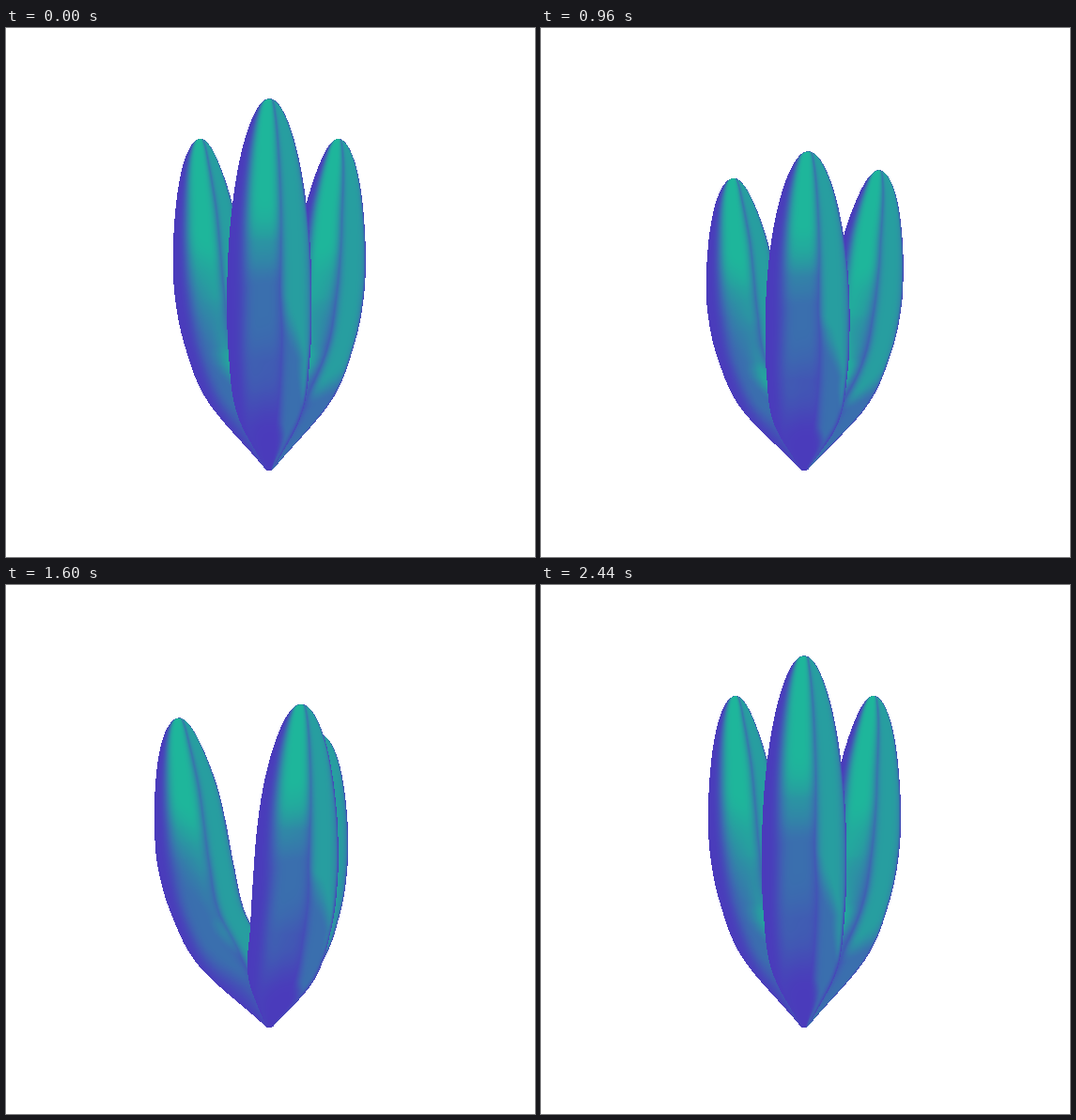
An HTML page with a canvas that plays this animation: 563x563 px, repeating every 2.48 s.

```html
<!DOCTYPE html>
<html>
<head>
<meta charset="utf-8">
<title>Turning petals</title>
<style>
html, body { margin: 0; width: 100%; height: 100%; overflow: hidden; background: #fff; }
canvas { position: absolute; left: 0; top: 0; width: 563px; height: 563px; }
</style>
</head>
<body>
<canvas id="stage" width="563" height="563"></canvas>
<script>
const SIZE = 563, LOOP = 2480, STEP = 40, LEAD = 10;
const BASE_X = 280.3, BASE_Y = 469.5, DEPTH = 0.00174, LIFT = 0.36;
const RINGS = 64, SIDES = 56;

// Petal profile from tip to base, at even steps of sqrt(1 - height)
const OUTER = [94, 101.5, 108.5, 114.5, 119, 122, 123, 120, 106, 76, 4];
const INNER = [94, 87, 79, 70.5, 61, 51.5, 44, 36.5, 25.5, -2, -4];
const WIDTH = [0, 7, 14, 21, 27.5, 33, 37, 38.8, 38.2, 32, 4];

const ctx = document.getElementById("stage").getContext("2d");
const image = ctx.createImageData(SIZE, SIZE);
const pixels = new Uint32Array(image.data.buffer);
const near = new Float32Array(SIZE * SIZE);

const clamp = (v, a = 0, b = 1) => Math.min(b, Math.max(a, v));
const smooth = (a, b, v) => {
  const p = clamp((v - a) / (b - a));
  return p * p * (3 - 2 * p);
};
const mix = (a, b, p) => a + (b - a) * p;

function curve(list, u) {
  const last = list.length - 1;
  const i = Math.min(last - 1, Math.floor(u * last)), f = u * last - i;
  const b = list[i], c = list[i + 1];
  const a = i > 0 ? list[i - 1] : 2 * b - c;
  const d = i + 2 <= last ? list[i + 2] : 2 * c - b;
  return b + 0.5 * f * (c - a + f * (2 * a - 5 * b + 4 * c - d + f * (3 * (b - c) + d - a)));
}

// Colour ramp from shade to light
const STOPS = [[0, 74, 59, 187], [0.4, 58, 111, 174], [0.8, 38, 160, 159], [1, 30, 182, 155]];
const ramp = new Uint32Array(256).map((_, i) => {
  const t = i / 255;
  let k = 0;
  while (k < 2 && t > STOPS[k + 1][0]) k++;
  const a = STOPS[k], b = STOPS[k + 1], p = (t - a[0]) / (b[0] - a[0]);
  const ch = n => Math.round(mix(a[n], b[n], p));
  return (255 << 24 | ch(3) << 16 | ch(2) << 8 | ch(1)) >>> 0;
});

const profile = [];
for (let i = 0; i <= RINGS; i++) {
  const u = mix(0.004, 1, i / RINGS);
  const at = q => {
    const o = curve(OUTER, q), n = curve(INNER, q);
    return [(o + n) / 2, (o - n) / 2, curve(WIDTH, q)];
  };
  const from = Math.max(0, u - 0.004), to = Math.min(1, u + 0.004);
  const lo = at(from), hi = at(to);
  profile.push({ u, v: at(u), d: hi.map((h, k) => (h - lo[k]) / (to - from)) });
}

function vertex(ring, phi, angle, height, reach) {
  const { u, v: [c0, h, w], d: [dc0, dh, dw] } = ring;
  const c = c0 + reach * (1 - u * u), dc = dc0 - 2 * u * reach;
  const co = Math.cos(phi), si = Math.sin(phi);
  const r = c + h * co, q = w * si, y = height * (1 - u * u), dy = -2 * u * height;
  const nr = -w * co * dy, nq = -h * si * dy;
  const ny = h * si * dw * si + w * co * (dc + dh * co);
  const len = Math.hypot(nr, nq, ny) || 1;
  const ca = Math.cos(angle), sa = Math.sin(angle);
  const z = r * ca - q * sa, s = 1 / (1 - DEPTH * z);
  return {
    x: BASE_X + (r * sa + q * ca) * s,
    y: BASE_Y - (y - LIFT * z) * s,
    s,
    nx: (nr * sa + nq * ca) / len,
    ny: ny / len,
    nz: (nr * ca - nq * sa) / len
  };
}

// Two soft lights, seen relative to the line of sight
function shade(px, py, nx, ny, nz) {
  const len = Math.hypot(nx, ny, nz) || 1;
  nx /= len; ny /= len; nz /= len;
  const vx = -DEPTH * (px - BASE_X), vy = LIFT - DEPTH * (BASE_Y - py);
  const vl = Math.hypot(vx, vy, 1);
  const face = Math.max(0, (nx * vx + ny * vy + nz) / vl);
  const m = nx - face * vx / vl, n = ny - face * vy / vl;
  const main = Math.exp(-Math.pow((m + 0.15) / 0.5, 4));
  const side = Math.exp(-Math.pow((m - 0.65) / 0.38, 4));
  const mainLevel = 0.4 * smooth(-0.85, -0.25, n) + 0.6 * smooth(-0.12, 0.2, n);
  const edge = n + 0.2 * (m - 0.65);
  const sideLevel = 0.4 * smooth(-0.87, -0.72, n) + 0.38 * smooth(-0.42, -0.2, edge);
  const t = Math.max(main * mainLevel, side * sideLevel);
  return ramp[Math.round(255 * clamp(t * (0.15 + 0.85 * smooth(0.03, 0.38, face))))];
}

function triangle(a, b, c) {
  const area = (b.x - a.x) * (c.y - a.y) - (c.x - a.x) * (b.y - a.y);
  if (Math.abs(area) < 1e-6) return;
  const x0 = Math.ceil(Math.min(a.x, b.x, c.x) - 0.5), x1 = Math.max(a.x, b.x, c.x) - 0.5;
  const y0 = Math.ceil(Math.min(a.y, b.y, c.y) - 0.5), y1 = Math.max(a.y, b.y, c.y) - 0.5;
  for (let y = y0; y <= y1; y++) {
    for (let x = x0; x <= x1; x++) {
      const px = x + 0.5, py = y + 0.5;
      const wb = ((px - a.x) * (c.y - a.y) - (c.x - a.x) * (py - a.y)) / area;
      const wc = ((b.x - a.x) * (py - a.y) - (px - a.x) * (b.y - a.y)) / area;
      const wa = 1 - wb - wc;
      if (wa < -1e-5 || wb < -1e-5 || wc < -1e-5) continue;
      const s = wa * a.s + wb * b.s + wc * c.s, i = y * SIZE + x;
      if (s <= near[i]) continue;
      near[i] = s;
      pixels[i] = shade(px, py,
        wa * a.nx + wb * b.nx + wc * c.nx,
        wa * a.ny + wb * b.ny + wc * c.ny,
        wa * a.nz + wb * b.nz + wc * c.nz);
    }
  }
}

function petal(angle, height, reach) {
  let prev = null;
  for (const ring of profile) {
    const row = [];
    for (let j = 0; j <= SIDES; j++) {
      row.push(vertex(ring, j / SIDES * Math.PI * 2, angle, height, reach));
    }
    if (prev) {
      for (let j = 0; j < SIDES; j++) {
        triangle(prev[j], prev[j + 1], row[j]);
        triangle(prev[j + 1], row[j + 1], row[j]);
      }
    }
    prev = row;
  }
}

function draw(time) {
  const p = (time + LEAD) / LOOP;
  const turn = 2 * Math.PI * smooth(0, 1, p);
  const squash = smooth(0, 1, 1 - Math.abs(2 * p - 1));
  const third = Math.PI * 2 / 3;
  pixels.fill(0);
  near.fill(0);
  petal(turn, 363 - 39 * squash, 1 + 8 * squash);
  petal(turn - third, 363 - 52 * squash, -3);
  petal(turn + third, 363 - 52 * squash, -3);
  ctx.putImageData(image, 0, 0);
}

const start = performance.now();
let shown = -1;
function tick() {
  const t = Math.floor(((performance.now() - start) % LOOP) / STEP) * STEP;
  if (t !== shown) draw(shown = t);
  requestAnimationFrame(tick);
}
tick();
</script>
</body>
</html>
```
